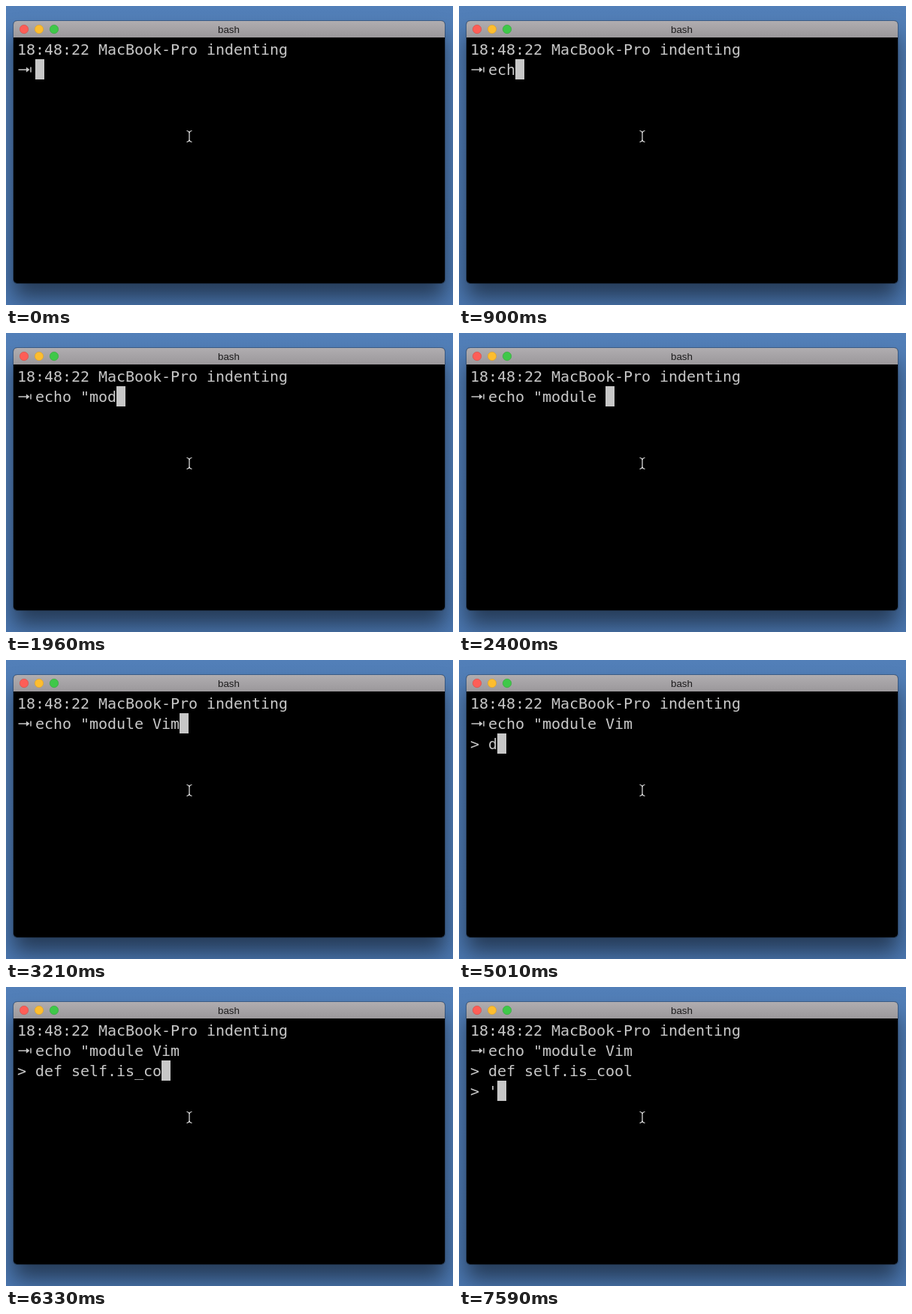
An HTML page for the animation above (8 s loop, 595 px wide and 399 px high).

```html
<!DOCTYPE html>
<html lang="en">
<head>
<meta charset="utf-8">
<title>bash</title>
<style>
  html, body { margin: 0; width: 100%; height: 100%; overflow: hidden; background: #4f7cb5; }
  svg { display: block; width: 595px; height: 399px; }
  .window { filter: drop-shadow(0 20px 14px rgba(0, 0, 0, .5)); }
  .title { font: 13.4px "Liberation Sans", Arial, sans-serif; fill: #1d1c1d; text-anchor: middle; }
  .term { fill: #c7c7c7; }
  .term text { font: 20px "DejaVu Sans Mono", monospace; letter-spacing: -.041px; white-space: pre; }
</style>
</head>
<body>
<svg viewBox="0 0 595 399">
  <defs>
    <linearGradient id="desk" x2="0" y2="1">
      <stop stop-color="#527fb8"/><stop offset="1" stop-color="#4b77b0"/>
    </linearGradient>
    <linearGradient id="bar" x2="0" y2="1">
      <stop stop-color="#b0adb0"/><stop offset="1" stop-color="#9b989b"/>
    </linearGradient>
  </defs>
  <rect width="595" height="399" fill="url(#desk)"/>
  <rect class="window" x="10" y="20" width="574" height="350" rx="5"/>
  <path d="M10 42V25q0-5 5-5H579q5 0 5 5V42z" fill="url(#bar)"/>
  <rect x="9.5" y="19.5" width="575" height="351" rx="5" fill="none" stroke="#000" stroke-opacity=".25"/>
  <g stroke-opacity=".6">
    <circle cx="24" cy="31" r="5.7" fill="#fd5e57" stroke="#dc4740"/>
    <circle cx="44" cy="31" r="5.7" fill="#fdbd2f" stroke="#d99e29"/>
    <circle cx="64" cy="31" r="5.7" fill="#3fc849" stroke="#30a838"/>
  </g>
  <text class="title" x="296.5" y="36">bash</text>
  <g class="term">
    <text x="15" y="65">18:48:22 MacBook-Pro indenting</text>
    <path d="M16.5 85H28M33 81.5V88.5" stroke="#c7c7c7" stroke-width="1.5"/>
    <path d="M27 81.5L31.5 85L27 88.5z"/>
    <text class="line" x="39" y="92"></text>
    <text class="line" x="15" y="119"></text>
    <text class="line" x="15" y="146"></text>
    <rect id="caret" width="12" height="27"/>
  </g>
  <path d="M240.5 166.5Q244 167 244 170V178Q244 181 240.5 181.5M247.5 166.5Q244 167 244 170V178Q244 181 247.5 181.5"
    fill="none" stroke="#e8e8e8" stroke-width="1.2"/>
</svg>
<script>
const LOOP = 8000;

// Each burst of keys is typed evenly between its first and last time (ms).
const BURSTS = [
  ['ec', 450, 720], ['ho ', 900, 1070], ['"', 1430],
  ['mod', 1880, 1960], ['ule ', 2140, 2400], ['V', 2940], ['im', 3120, 3210], ['\n', 3930],
  ['def self.', 5010, 5620], ['is', 5800, 5890], ['_c', 6160, 6330], ['ool', 6330, 6690], ['\n', 6960],
  ["'", 7590]
];
const rows = document.querySelectorAll('.line');
const caret = document.getElementById('caret');

function typedAt(t) {
  return BURSTS.map(([keys, first, last = first]) => {
    const gap = (last - first) / Math.max(1, keys.length - 1);
    return [...keys].filter((_, i) => t >= first + i * gap).join('');
  }).join('');
}

function draw() {
  const lines = typedAt(performance.now() % LOOP).split('\n');
  rows.forEach((row, i) => {
    row.textContent = i < lines.length ? (i ? '> ' : '') + lines[i] : '';
  });
  const last = lines.length - 1;
  caret.setAttribute('x', 39 + 12 * lines[last].length);
  caret.setAttribute('y', 71 + 27 * last);
  requestAnimationFrame(draw);
}
draw();
</script>
</body>
</html>
```
